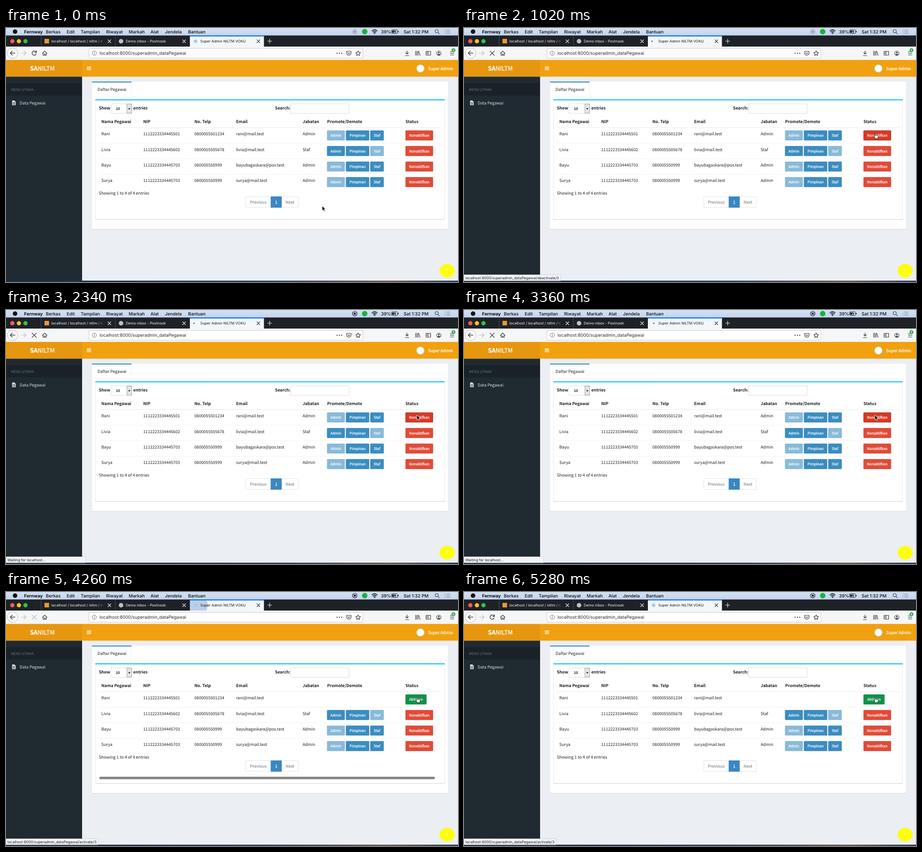
An HTML page for the animation above (5340 ms loop, 998 by 561 pixels).

```html
<!DOCTYPE html>
<html lang="id">
<head>
<meta charset="utf-8">
<title>Data Pegawai</title>
<style>
html, body { margin: 0; width: 100%; height: 100%; overflow: hidden; background: #ebeef2; }
svg { display: block; width: 998px; height: 561px; }
text { font: 500 9.13px "Noto Sans CJK JP", "Noto Sans CJK SC", "Noto Sans", sans-serif; fill: #1c2024; text-rendering: geometricPrecision; white-space: pre; }
.b { font-weight: 700; }
.mid { text-anchor: middle; }
.white { fill: #fff; stroke: #fff; stroke-width: .25; }
.btn { font-size: 7.85px; fill: #fff; stroke: #fff; stroke-width: .25; text-anchor: middle; }
.menu { font: 500 9.8px Inter, "Open Sans", sans-serif; fill: #0b0d10; }
.menu.b { font-weight: 700; }
.url { font: 400 9.8px Inter, "Open Sans", sans-serif; fill: #2c2c30; }
.ui { font: 400 8px Inter, "Open Sans", sans-serif; fill: #1a1a1c; }
.ui.white { fill: #f4f5f7; stroke: none; }
.line { fill: none; stroke: #39393d; stroke-width: 1.2; stroke-linecap: round; stroke-linejoin: round; }
.pale { stroke: #b9babd; }
.cursor { animation: travel 5340ms infinite; }
.dot { animation: bounce 1335ms -315ms infinite; }
.burst { transform-origin: 419px 29px; animation: burst 5340ms infinite; }
.bar { animation: fade 5340ms infinite; }
@keyframes travel {
  0%, 1.12% { transform: translate(698px, 393px); animation-timing-function: ease-in-out; }
  11.2%, 100% { transform: translate(907px, 232px); }
}
@keyframes bounce {
  0%, 100% { transform: translateX(-4px); animation-timing-function: ease-in-out; }
  50% { transform: translateX(4px); animation-timing-function: ease-in-out; }
}
@keyframes burst {
  0%, 79.77% { opacity: 0; transform: scale(1); }
  79.775% { opacity: .75; transform: scale(1); }
  88%, 100% { opacity: 0; transform: scale(5); }
}
@keyframes fade {
  0%, 79.77% { opacity: 0; }
  79.775%, 85% { opacity: 1; }
  89%, 100% { opacity: 0; }
}
</style>
</head>
<body>
<svg viewBox="0 0 998 561">
  <defs>
    <linearGradient id="sky" x2="0" y2="1"><stop stop-color="#d2e0f3"/><stop offset="1" stop-color="#c3d4ec"/></linearGradient>
    <linearGradient id="desk"><stop stop-color="#1b2b44"/><stop offset=".6" stop-color="#30435f"/><stop offset=".85" stop-color="#6a5a58"/><stop offset="1" stop-color="#2b3a55"/></linearGradient>
    <linearGradient id="tabEnd"><stop stop-color="#1e2227" stop-opacity="0"/><stop offset="1" stop-color="#1e2227"/></linearGradient>
    <clipPath id="tabClip"><path d="M406 19h163v22h-163z"/></clipPath>
    <clipPath id="faceClip"><path d="M905 80h16v20h-16z"/></clipPath>
  </defs>

  <!-- menu bar -->
  <path fill="url(#sky)" d="M0 0h998v17H0z"/>
  <circle cx="20" cy="8" r="5" fill="#111"/>
  <g id="menus"></g>
  <g data-on="0-1140"><circle cx="770" cy="8" r="5" fill="none" stroke="#8d98a8"/><circle cx="770" cy="8" r="3" fill="#9aa5b5"/></g>
  <g data-on="1140-5340"><circle cx="770" cy="8" r="5" fill="none" stroke="#15181c" stroke-width="1.2"/><path d="M767.8 5.8h4.4v4.4h-4.4z" fill="#15181c"/></g>
  <circle cx="792" cy="8" r="6" fill="#12b53a"/>
  <path class="line" d="M808 6.2q5.800-5.200 11.600 0M810 8.500q3.800-3.200 7.600 0M812 10.600q1.800-1.300 3.600 0" style="stroke:#111;stroke-width:1.5"/>
  <circle cx="813.8" cy="12.3" r="1" fill="#111"/>
  <rect x="851" y="4" width="13.5" height="8" rx="1.5" fill="none" stroke="#222"/>
  <path d="M852.5 5.5h4v5h-4zM865.5 6.5h1.5v3h-1.5zM859.5 3l-2.8 5.5h2.3l-.8 4.3 3.5-5.6h-2.5z" fill="#111"/>
  <circle class="line" cx="951" cy="7" r="3.5"/><path class="line" d="M953.6 9.7l3.2 3.2"/>
  <path d="M968 4.5h2m2 0h9M968 8h2m2 0h9M968 11.5h2m2 0h9" stroke="#7b8796" stroke-width="1.2"/>

  <!-- tabs -->
  <path fill="#1e2227" d="M0 16.5h998V41H0z"/>
  <circle cx="14" cy="29.3" r="4.7" fill="#fc5b57"/><circle cx="28.5" cy="29.3" r="4.7" fill="#fdbc2e"/><circle cx="43" cy="29.3" r="4.7" fill="#2bc840"/>
  <path d="M77.5 17v24M241.5 17v24" stroke="#474b52"/>
  <rect x="85" y="24" width="10" height="10" fill="#ef9733"/>
  <text class="ui white" x="100" y="32">localhost / localhost / niltm / n</text>
  <path fill="url(#tabEnd)" d="M202 20h17v20h-17z"/><path fill="#1e2227" d="M219 20h20v20h-20z"/>
  <circle cx="254" cy="29.3" r="5" fill="#b6c3cc"/>
  <text class="ui white" x="264.5" y="32">Demo inbox - Postnook</text>
  <path class="line" style="stroke:#e6e7ea" d="M225 26l6.5 6.5m0-6.5l-6.5 6.5M390 26l6.5 6.5m0-6.5l-6.5 6.5M577.5 29h9.5m-4.75-4.75v9.5"/>
  <path fill="#f5f6f7" d="M406 17h163.5v24H406z"/>
  <g clip-path="url(#tabClip)"><circle class="burst" cx="419" cy="29" r="26" fill="#a9c0e2"/></g>
  <path fill="#0a84ff" d="M406 16.8h163.5v1.9H406z"/>
  <circle data-on="0-900 4260-5340" cx="418.5" cy="29.3" r="4" fill="#a5cfec"/>
  <g data-on="900-4260"><circle class="dot" cx="419" cy="29.3" r="1.5" fill="#54575e"/></g>
  <text class="ui" x="429" y="32">Super Admin NILTM VOKU</text>
  <path class="line" d="M554 26l6.5 6.5m0-6.5l-6.5 6.5"/>

  <!-- toolbar -->
  <path fill="#f5f6f7" d="M0 41h998v30H0z"/>
  <circle cx="14.5" cy="55.5" r="11.5" fill="#fff" stroke="#b4b5b8"/>
  <path class="line" style="stroke-width:1.4" d="M9.5 55.5h10.5m-6-4.7l-4.7 4.7 4.7 4.7"/>
  <path class="line pale" d="M34 55.5h10m-4.5-4.7l4.7 4.7-4.7 4.7"/>
  <path data-on="0-900 4740-5340" class="line" style="stroke-width:1.4" d="M66.5 53.5a4.7 4.7 0 1 0 .1 3.8M67.2 50.5v3.5h-3.5"/>
  <path data-on="900-4260" class="line" d="M57.5 51l9.5 9.5m0-9.5l-9.5 9.5"/>
  <path data-on="4260-4740" class="line pale" d="M57.5 51l9.5 9.5m0-9.5l-9.5 9.5"/>
  <path class="line" d="M80.5 56l5-5 5 5M82 55.5v5h2.5v-3h2v3h2.5v-5"/>
  <rect x="183" y="45" width="605" height="21.5" rx="1.5" fill="#fff" stroke="#c9cacd"/>
  <circle cx="195" cy="55.7" r="4.7" fill="none" stroke="#6b6c70"/><path d="M195 54.8v3.5M195 52.7v1.2" stroke="#6b6c70" stroke-width="1.2"/>
  <text class="url" x="206.5" y="59.4">localhost:8000/superadmin_dataPegawai</text>
  <path d="M731 55.7h.1m5 0h.1m5 0h.1" stroke="#4a4a4f" stroke-width="2.6" stroke-linecap="round"/>
  <path class="line" d="M752 51.5h10v3.5a5 5 0 0 1-10 0zM754.5 54.5l2.5 2.4 2.5-2.4M777.5 50.5l1.6 3.4 3.7.5-2.7 2.6.7 3.7-3.3-1.8-3.3 1.8.7-3.7-2.7-2.6 3.7-.5z"/>
  <path class="line" d="M885.5 50.5v7m-3-3l3 3 3-3M881.5 61h8M904.5 51v9.5m2.7-9.5v9.5m2.7-9.5v9.5m1.5-9.2l2.8 9.2M927.5 51.5h10v8.5h-10zM931.8 51.5v8.5M929 54h1.2m-1.2 2.5h1.2M981 52h8M981 55.7h8M981 59.5h8"/>
  <circle class="line" cx="955.7" cy="55.7" r="4.7"/><circle cx="955.7" cy="54.3" r="1.8" fill="#39393d"/><path d="M952.5 58.5q3.2-2.6 6.4 0-3.2 3-6.4 0z" fill="#39393d"/>
  <circle cx="988" cy="49" r="4.3" fill="#30a352"/><path d="M988 51.5v-4.5m-2 2l2-2 2 2" fill="none" stroke="#fff"/>

  <!-- page frame -->
  <path fill="#f1a00f" d="M168 70.5h830v37H168z"/><path fill="#e6960f" d="M0 70.5h168v37H0z"/>
  <text class="white" style="font-size:13.3px;font-weight:400" x="53" y="94.2"><tspan class="b">SA</tspan>NILTM</text>
  <path d="M178.5 86h9.5m-9.5 3h9.5m-9.5 3h9.5" stroke="#fff" stroke-width="1.7"/>
  <g data-on="0-3780 4260-5340"><circle cx="915" cy="89.5" r="9" fill="#d5d8dc"/><circle cx="915" cy="89.3" r="7.6" fill="#fff"/></g>
  <g data-on="3780-4260" clip-path="url(#faceClip)"><text class="white" x="909" y="93">User Image</text></g>
  <text class="white" x="932" y="93">Super Admin</text>
  <path fill="#1f2a31" d="M0 107.5h168V558H0z"/><path fill="#1a2228" d="M0 122h168v27H0z"/>
  <text style="font-size:7.85px;fill:#5f7681" x="11" y="138.7">MENU UTAMA</text>
  <path d="M13.5 160h5l3 3v7.5h-8z" fill="#d3dbdf"/><path d="M15 164.5h5m-5 2h5m-5 2h5" stroke="#1f2a31" stroke-width=".8"/>
  <text style="fill:#d6dfe3" x="30" y="168.7">Data Pegawai</text>

  <g id="page"></g>

  <ellipse cx="974" cy="536" rx="16.7" ry="14.7" fill="#ff0"/>
  <path d="M974 540.5v-8m-2.5 2.5l2.5-2.5 2.5 2.5" fill="none" stroke="#ffffa0" stroke-width="1.2"/>
  <path fill="url(#desk)" d="M0 558h998v3H0z"/>
  <g id="status"></g>

  <g class="cursor">
    <path data-on="0-600 1740-4260" d="M0 0v10.6l2.5-2.3 1.7 3.9 1.9-.8-1.7-3.8h3.4z" fill="#0a0a0a" stroke="#fff" stroke-width=".8"/>
    <path data-on="600-1740 4260-5340" d="M-.8 2.2c0-1.5 1.9-1.5 2.1 0l.5 3 1.3-.7 1.5.5 1.4-.1 1.3 1.2c.5 2.4-.2 3.5-.8 5.4v1H1.6L-.8 9l-1.3-1.6c-.3-1.2.9-1.3 1.6-.6l.5.5z" fill="#fff" stroke="#0a0a0a" stroke-width=".9" stroke-linejoin="round"/>
  </g>
</svg>
<script>
const LOOP = 5340;
const $ = id => document.getElementById(id);
const text = (x, y, s, cls = '') => `<text class="${cls}" x="${x}" y="${y}">${s}</text>`;
const box = (x, y, w, h, fill, stroke = 'none', rx = 0) =>
  `<rect x="${x}" y="${y}" width="${w}" height="${h}" rx="${rx}" fill="${fill}" stroke="${stroke}" stroke-width=".8"/>`;
const during = (spans, body) => `<g data-on="${spans}">${body}</g>`;

const BLUE = ['#3a8dc1', '#347fad'], RED = ['#e04b38', '#d4402d'], GREEN = ['#1baa51', '#169348'];
const RED_HOVER = ['#d93925', '#80261a'], GREEN_HOVER = ['#11914a', '#0d7d3f'];
const FULL = '0-3780 4260-5340', BRIEF = '3780-4260';

function button(x, y, w, label, [fill, edge], off) {
  return `<g opacity="${off ? .6 : 1}">${box(x + .4, y + .4, w - .8, 21.2, fill, edge, 1)}${text(x + w / 2, y + 14, label, 'btn')}</g>`;
}

const people = {
  rani: ['Rani', '1112223334445501', '0800055501234', 'rani@mail.test', 'Admin'],
  livia: ['Livia', '1112223334445602', '0800055505678', 'livia@mail.test', 'Staf'],
  bayu: ['Bayu', '1112223334445703', '080005550999', 'bayubagaskara@pos.test', 'Admin'],
  surya: ['Surya', '1112223334445703', '080005550999', 'surya@mail.test', 'Admin']
};
const roles = [['Admin', 0, 39.5], ['Pimpinan', 41.8, 51.5], ['Staf', 95.5, 30]];
const heads = ['Nama Pegawai', 'NIP', 'No. Telp', 'Email', 'Jabatan', 'Promote/Demote', 'Status'];

function row(cols, top, i, key, active = true, paint) {
  const y = top + i * 34.35, p = people[key];
  let out = p.slice(0, active ? 5 : 4).map((s, c) => text(cols[c], y + 17.4, s)).join('');
  if (active) out += roles.map(([r, dx, w]) => button(cols[5] + dx - .3, y + 6.3, w, r, BLUE, r === p[4])).join('');
  out += active ? button(cols[6], y + 6.3, 61, 'Nonaktifkan', paint || RED)
                : button(cols[6], y + 6.3, 46.5, 'Aktifkan', paint || GREEN);
  return out + (i < 3 ? box(205, y + 34, 756, .8, '#eff0f1') : '');
}

const header = (cols, top) =>
  heads.map((h, i) => text(cols[i], top - 10.3, h, 'b')).join('') + box(205, top - .5, 756, 1, '#e9eaec');

// White panel with a tab strip and an inner card
const panel = (bottom, inner) =>
  box(190, 119, 786, bottom - 118, '#d3d7dc', 'none', 2) + box(190, 118.5, 786, bottom - 118.5, '#fff', 'none', 2) +
  box(190, 151, 786, .8, '#f1f2f3') + box(276, 119, .9, 32, '#eceef0') + box(190, 118.2, 87, 2.2, '#3a8dc1') +
  text(202, 139.2, 'Daftar Pegawai') +
  box(197, 159, 772, inner - 158, '#dcdee1', 'none', 2) + box(197.6, 159, 770.8, inner - 159.4, '#fff', 'none', 2) +
  box(197, 157.4, 772, 2.4, '#0cc3ef', 'none', 1);

const controls =
  text(205, 180.3, 'Show', 'b') + box(232, 167.3, 45.5, 21, '#fff', '#cfd4da') +
  '<text class="b" x="242.5" y="181" style="font-size:7.8px">10</text>' +
  box(267, 168, 10.3, 20, '#e6e6e6', '#8d8d8d') + '<path d="M269.7 177.2h5l-2.5 3z" fill="#111"/>' +
  text(281, 180.3, 'entries', 'b') + text(594, 180.3, 'Search:', 'b') +
  box(628, 167.3, 129.5, 21, '#fff', '#cfd4da') +
  text(205, 368, 'Showing 1 to 4 of 4 entries') +
  box(529.4, 372.4, 116, 24, '#fff', '#d9dbde', 2) + box(584.4, 372, 24.4, 24.8, '#3a87c2') +
  '<g opacity=".65">' + text(557, 388, 'Previous', 'mid') + text(627, 388, 'Next', 'mid') + '</g>' +
  text(596.5, 388, '1', 'mid white');

const wide = [210.5, 303, 416, 508, 655, 709, 882];
const tight = [210.5, 305, 417.5, 512, 655, 712.8, 879];

$('page').innerHTML =
  during(FULL, panel(444, 422.5) + controls + header(wide, 220) +
    ['livia', 'bayu', 'surya'].map((k, i) => row(wide, 220, i + 1, k)).join('')) +
  during('0-600', row(wide, 220, 0, 'rani')) +
  during('600-3780', row(wide, 220, 0, 'rani', true, RED_HOVER)) +
  during('4260-5340', row(wide, 220, 0, 'rani', false, GREEN_HOVER)) +
  during(BRIEF, panel(361, 339) + header(tight, 194.5) +
    ['livia', 'surya', 'rani', 'bayu'].map((k, i) => row(tight, 194.5, i, k, k !== 'rani')).join('')) +
  '<rect class="bar" x="206" y="408" width="741" height="5.4" rx="2.7" fill="#888384"/>';

const menus = [[88, 'Berkas'], [134, 'Edit'], [165, 'Tampilan'], [221, 'Riwayat'], [271, 'Markah'], [319, 'Alat'],
  [351, 'Jendela'], [402, 'Bantuan'], [828, '39%'], [878, 'Sat 1:32 PM']];
$('menus').innerHTML = text(40, 11.7, 'Fernway', 'menu b') + menus.map(([x, s]) => text(x, 11.7, s, 'menu')).join('');

const link = 'localhost:8000/superadmin_dataPegawai/';
$('status').innerHTML = [
  ['600-1740', 214, link + 'deactivate/3'],
  ['1740-3600', 176, 'Waiting for localhost...'],
  ['3600-4260', 176, 'Transferring data from localhost...'],
  ['4260-5340', 204, link + 'activate/3']
].map(([t, w, s]) => during(t, box(-1, 545, w + 1, 13.2, '#f3f4f5', '#c6c9cd', 1) + text(3, 554.6, s, 'ui'))).join('');

// Hard on/off windows, given in milliseconds; every offset is used once
for (const el of document.querySelectorAll('[data-on]')) {
  const steps = new Map([[0, 0]]);
  for (const span of el.dataset.on.split(' ')) {
    const [from, to] = span.split('-').map(Number);
    steps.set(from, 1).set(to, to === LOOP ? 1 : 0);
  }
  if (!steps.has(LOOP)) steps.set(LOOP, 0);
  const frames = [...steps].map(([ms, opacity]) => ({ offset: ms / LOOP, opacity, easing: 'step-end' }));
  el.animate(frames, { duration: LOOP, iterations: Infinity });
}
</script>
</body>
</html>
```
